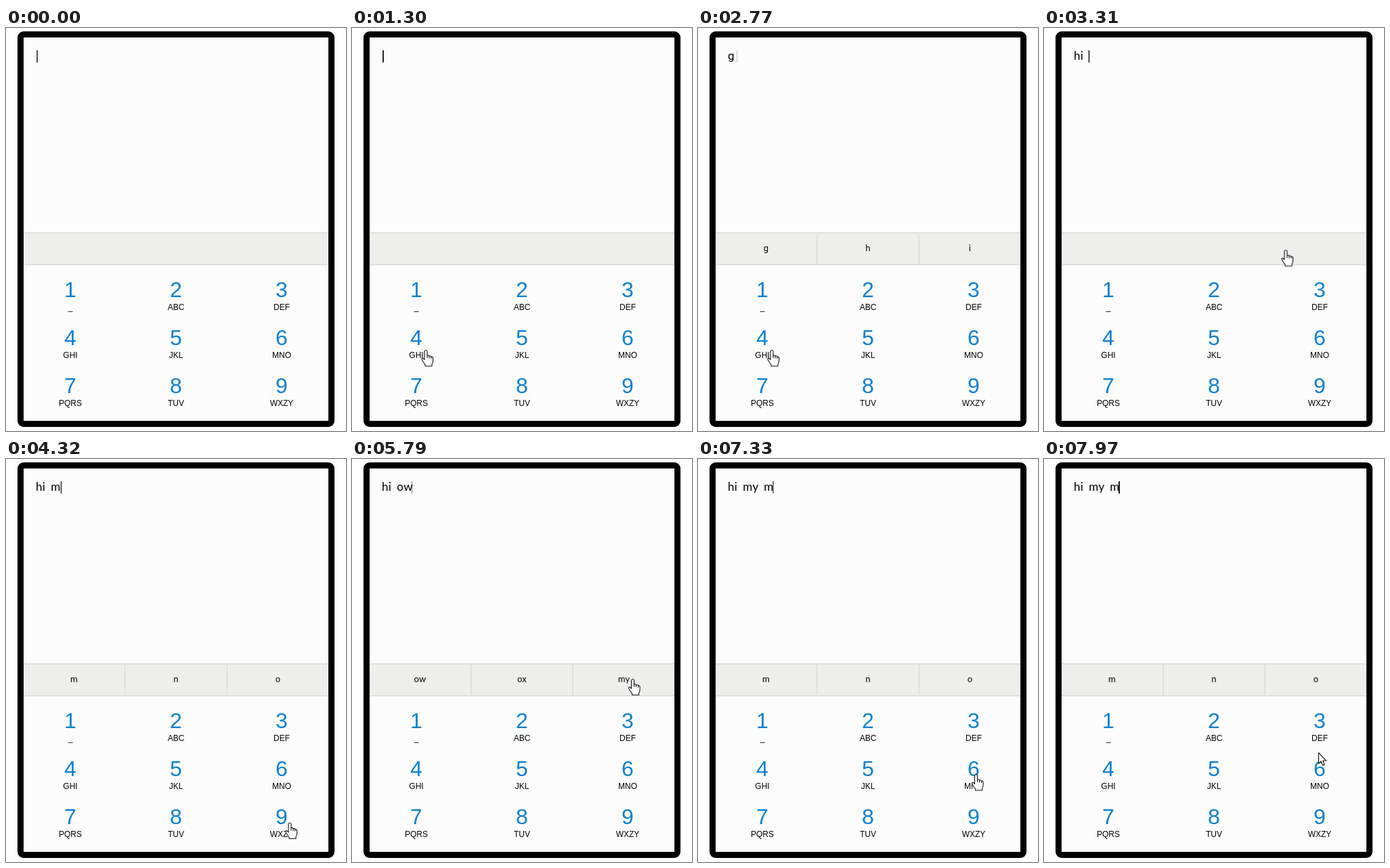
These frames come from a looping animation (502 by 596 pixels, 8 s). An HTML page:

```html
<!DOCTYPE html>
<html lang="en">
<head>
<meta charset="utf-8">
<title>Keypad typing</title>
<style>
html, body { margin: 0; width: 100%; height: 100%; overflow: hidden; background: #fff; }
svg { display: block; width: 502px; height: 596px; }
.digit { font: 32px "Liberation Sans", Arial, sans-serif; fill: #0c80cc; text-anchor: middle; }
.label { font: 12px "Liberation Sans", Arial, sans-serif; text-anchor: middle; }
.typed { font: 17px Lato, sans-serif; letter-spacing: .3px; word-spacing: 3.5px; white-space: pre; }
.word { font: 13px Lato, sans-serif; letter-spacing: .2px; text-anchor: middle; }
.round { font-family: Roboto, sans-serif; }
.pointer path { fill: #fff; stroke: #111; stroke-width: 1.1; stroke-linejoin: round; }
</style>
</head>
<body>
<svg viewBox="0 0 502 596">
  <rect x="17" y="5" width="468" height="585" rx="9"/>
  <rect x="26" y="14" width="450" height="567" fill="#fcfcfc"/>
  <rect x="26" y="302" width="450" height="49" fill="#dfdfdf"/>
  <rect x="26" y="304" width="450" height="45" fill="#eeeeed"/>
  <g id="words">
    <path d="M176 304V349M326 304V349" stroke="#dfdfdf" stroke-width="2"/>
  </g>
  <g id="keys"></g>
  <text id="typed" class="typed" x="44" y="46.5"></text>
  <rect id="caret" y="33" width="2" height="18"/>
  <g id="pointer" class="pointer">
    <path id="arrow" d="M.5 .5V16.5L4.2 13.2L6.6 19L9.2 18L6.8 12.2H11.7Z"/>
    <g id="hand">
      <path d="M-2 2Q0 -1 2 2V8.3Q4.5 7.3 5 9.3Q7.5 8.3 8 10.3Q10.6 9.7 10.6 12V16Q10.6 19 9 21V24H-1V22L-5.4 15.5Q-6.8 12 -4.4 12.2L-2 14.5Z"/>
      <path d="M2 8V12M5 9V12.5M8 10V13" style="fill:none"/>
    </g>
  </g>
</svg>
<script>
const LOOP = 8000;
const BLINK = 985, BLINK_PEAK = 190;
const COLS = [95, 251, 407];
const LABELS = ["_", "ABC", "DEF", "GHI", "JKL", "MNO", "PQRS", "TUV", "WXZY"];

// start time, typed text, caret centre, suggestions
const STATES = [
  [0, "", 46, ""],
  [1500, "g", 57.5, "g h i"],
  [3010, "gi", 61.5, "gi ii hi"],
  [3240, "hi ", 66.5, ""],
  [4090, "hi m", 81.5, "m n o"],
  [5330, "hi ow", 88.5, "ow ox my"],
  [5940, "hi my ", 95.5, ""],
  [6800, "hi my m", 111, "m n o"]
];

// time, x, y of the pointer tip
const PATH = [
  [70, 377, 571], [760, 109, 476], [3000, 109, 476],
  [3270, 357, 328], [3700, 357, 328], [3960, 410, 467], [4060, 410, 467],
  [4300, 419, 537.5], [4620, 419, 537.5], [5090, 413, 371], [5240, 413, 371],
  [5560, 414.5, 325], [6080, 414.5, 325], [6500, 410.5, 466],
  [7740, 410.5, 466], [7960, 405, 434]
];

const $ = id => document.getElementById(id);

function addText(parent, cls, x, y, text = "") {
  const el = document.createElementNS("http://www.w3.org/2000/svg", "text");
  el.setAttribute("class", cls);
  el.setAttribute("x", x);
  el.setAttribute("y", y);
  el.textContent = text;
  return parent.appendChild(el);
}

LABELS.forEach((label, i) => {
  const x = COLS[i % 3], y = 398 + 71 * Math.floor(i / 3);
  addText($("keys"), "digit", x, y, i + 1);
  addText($("keys"), "label", x, y + 19, label);
});
const slots = [100.5, 251, 401.5].map(x => addText($("words"), "word", x, 330));

// Lato has a two-storey g, so that letter takes a rounder face
const styled = s => s.replace(/g/g, '<tspan class="round">g</tspan>');

let shown = null;
function showState(state) {
  if (state === shown) return;
  shown = state;
  const [, text, x, words] = state;
  $("typed").innerHTML = styled(text);
  $("caret").setAttribute("x", x - 1);
  $("words").style.display = words ? "" : "none";
  words.split(" ").forEach((w, i) => { slots[i].innerHTML = styled(w); });
}

function tipAt(t) {
  const i = PATH.findIndex(p => p[0] > t);
  if (i < 0) return PATH[PATH.length - 1].slice(1);
  const [t0, x0, y0] = PATH[i - 1], [t1, x1, y1] = PATH[i];
  const u = (t - t0) / (t1 - t0), e = u * u * (3 - 2 * u);
  return [x0 + (x1 - x0) * e, y0 + (y1 - y0) * e];
}

function clickable(x, y) {
  if (y >= 302 && y < 351) return true;
  const row = (y - 369) % 71;
  return y >= 369 && row < 53 && COLS.some(c => Math.abs(x - c) < 35);
}

function showPointer(t) {
  const visible = t >= PATH[0][0];
  $("pointer").style.display = visible ? "" : "none";
  if (!visible) return;
  const [x, y] = tipAt(t), hand = clickable(x, y);
  $("pointer").setAttribute("transform", `translate(${x} ${y})`);
  $("hand").style.display = hand ? "" : "none";
  $("arrow").style.display = hand ? "none" : "";
}

function draw(t) {
  showState(STATES.filter(s => s[0] <= t).pop());
  $("caret").style.opacity = .5 + .5 * Math.cos(2 * Math.PI * (t - BLINK_PEAK) / BLINK);
  showPointer(t);
}

const start = performance.now();
function tick() {
  draw((performance.now() - start) % LOOP);
  requestAnimationFrame(tick);
}
tick();
</script>
</body>
</html>
```
